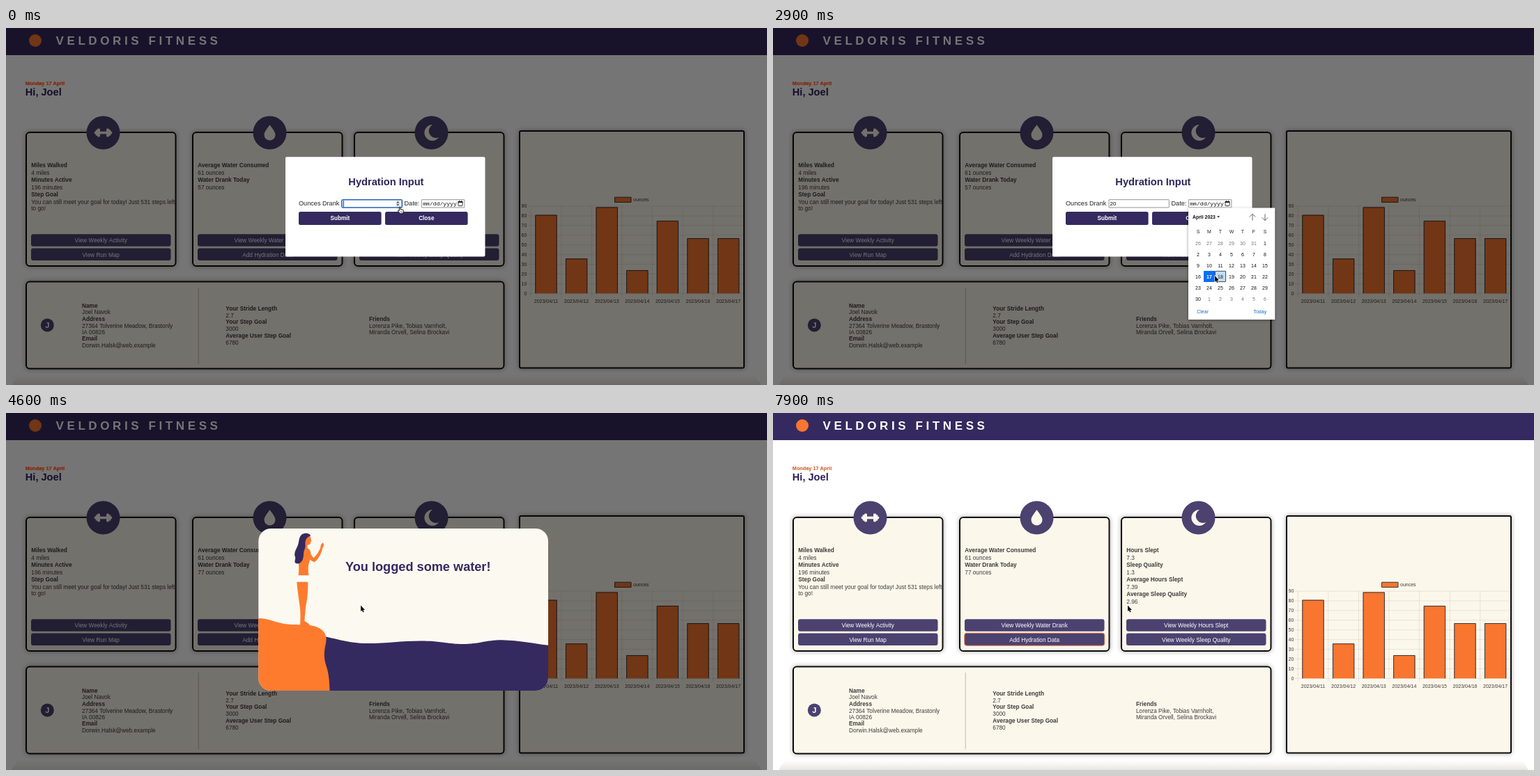
Animation, 1092 px wide and 513 px high, one loop 8000 ms. Source, as an HTML page with a canvas:

```html
<!DOCTYPE html>
<html lang="en">
<head>
<meta charset="utf-8">
<title>Fitness dashboard</title>
<style>
html, body { margin: 0; width: 100%; height: 100%; overflow: hidden; background: #fff; }
canvas { display: block; width: 1092px; height: 513px; }
</style>
</head>
<body>
<canvas id="stage"></canvas>
<script>
const W = 1092, H = 513, LOOP = 8000, STEP = 100;
const SANS = '"Liberation Sans", Arial, sans-serif';
const MONO = '"Liberation Mono", monospace';
const NAVY = '#352a5f', PURPLE = '#4b4270', ORANGE = '#f8762f', CREAM = '#fcf7eb', INK = '#3f3b3c';
const BODY = 8.25;

const canvas = document.getElementById('stage');
const c = canvas.getContext('2d');
const ratio = window.devicePixelRatio || 1;
canvas.width = W * ratio;
canvas.height = H * ratio;

// Event times in ms
const AT = { two: 1000, zero: 1200, open: 1900, picked: 3400, logged: 4600, closed: 7600 };

// Pointer stops: time, x, y
const STOPS = [
  [0, 565, 257], [200, 612, 259], [900, 612, 259], [1500, 642, 240.5], [1800, 651, 251],
  [2100, 651, 251], [2700, 634, 356], [2900, 634, 356], [3200, 630, 357],
  [3600, 630, 357], [4200, 509, 276.5], [8000, 509, 276.5]
];

function pointer(t) {
  const i = Math.max(1, STOPS.findIndex(s => s[0] > t));
  const [t0, x0, y0] = STOPS[i - 1], [t1, x1, y1] = STOPS[i];
  const k = (t - t0) / (t1 - t0), e = k * k * (3 - 2 * k);
  return { x: x0 + (x1 - x0) * e, y: y0 + (y1 - y0) * e };
}

function text(str, x, y, { size = BODY, color = INK, bold = false, align = 'left', font = SANS, gap = 0 } = {}) {
  c.font = `${bold ? 'bold ' : ''}${size}px ${font}`;
  c.letterSpacing = gap + 'px';
  c.textAlign = align;
  c.textBaseline = 'alphabetic';
  c.fillStyle = color;
  c.fillText(str, x, y);
}

function rect(x, y, w, h, color) {
  c.fillStyle = color;
  c.fillRect(x, y, w, h);
}

function box(x, y, w, h, r, fill, stroke, line = 1) {
  c.beginPath();
  c.roundRect(x, y, w, h, r);
  if (fill) { c.fillStyle = fill; c.fill(); }
  if (stroke) { c.strokeStyle = stroke; c.lineWidth = line; c.stroke(); }
}

function disc(x, y, r, color) {
  c.beginPath();
  c.arc(x, y, r, 0, Math.PI * 2);
  c.fillStyle = color;
  c.fill();
}

function shape(path, fill, stroke, line = 1) {
  const p = new Path2D(path);
  if (fill) { c.fillStyle = fill; c.fill(p); }
  if (stroke) { c.strokeStyle = stroke; c.lineWidth = line; c.stroke(p); }
}

function at(x, y, draw) {
  c.save();
  c.translate(x, y);
  draw();
  c.restore();
}

function shadow(color, blur, draw, dy = 0) {
  c.save();
  c.shadowColor = color;
  c.shadowBlur = blur * ratio;
  c.shadowOffsetY = dy * ratio;
  draw();
  c.restore();
}

function panel(x, y, w, h, r = 5) {
  shadow('rgba(70,60,50,.45)', 6, () => box(x, y, w, h, r, CREAM));
  box(x + 1, y + 1, w - 2, h - 2, r, CREAM, '#0b0a0c', 2);
}

// Rows of [baseline, text, bold]
function rows(x, list) {
  for (const [y, str, bold] of list) text(str, x, y, { bold: !!bold });
}

function pageButton(x, y, label) {
  box(x, y, 200.5, 17.5, 3, PURPLE);
  text(label, x + 100.2, y + 12, { color: '#fff', align: 'center' });
}

function card(x, icon, list, labels) {
  panel(x, 149, 216.5, 194);
  disc(x + 111.5, 150.5, 24, PURPLE);
  at(x + 111.5, 150.5, icon);
  rows(x + 8.3, list);
  labels.forEach((label, i) => pageButton(x + 8, 296.3 + i * 20.2, label));
}

function dumbbell() {
  box(-6, -1.8, 12, 3.6, 0, CREAM);
  for (const s of [-1, 1]) {
    box(s * 6.5 - 2, -6, 4, 12, 1.4, CREAM);
    box(s * 9.2 - 1.6, -4.3, 3.2, 8.6, 1.2, CREAM);
    box(s * 11.2 - 1.5, -1.7, 3, 3.4, 0.9, CREAM);
  }
}

function drop() {
  shape('M0 -11.5C2 -8 8 -2 8 3A8 8 0 0 1 -8 3C-8 -2 -2 -8 0 -11.5Z', CREAM);
}

function moon() {
  shape('M1.5 -11.4A11.4 11.4 0 1 0 10.8 6.2A9.2 9.2 0 0 1 1.5 -11.4Z', CREAM);
}

function chart() {
  panel(736, 147, 324, 342.5, 2);
  const left = 753.2, base = 381.4, col = 43.6, unit = 1.393;
  c.save();
  c.beginPath();
  c.rect(738, 149, 320, 338);
  c.clip();
  const grid = 'rgba(0,0,0,.1)';
  for (let v = 0; v <= 90; v += 10) {
    const y = base - v * unit;
    rect(749, y - 0.4, 310, 0.8, grid);
    text(String(v), 747.3, y + 2.4, { size: 7, align: 'right' });
  }
  for (let i = 0; i <= 7; i++) rect(left + i * col - 0.4, base - 90 * unit, 0.8, 90 * unit + 4.5, grid);
  [81, 36, 89, 24, 75, 57, 57].forEach((v, i) => {
    const x = left + (i + 0.5) * col, y = base - v * unit;
    rect(x - 15.6, y, 31.2, v * unit, ORANGE);
    shape(`M${x - 15.2} ${base}V${y + 0.5}H${x + 15.2}V${base}`, null, '#35343f', 1);
    text('2023/04/' + (11 + i), x, 394.6, { size: 7, align: 'center' });
  });
  c.restore();
  box(873.5, 243.2, 23.5, 7.2, 0, ORANGE, '#35343f', 1);
  text('ounces', 900, 249.2, { size: 7 });
}

function profile() {
  panel(28, 363.5, 687.5, 127);
  rect(275.7, 373, 0.9, 110, '#b9b5ae');
  disc(59.3, 427, 9.5, PURPLE);
  text('J', 59.3, 431, { size: 11, bold: true, color: '#fff', align: 'center' });
  rows(109, [
    [401.5, 'Name', 1], [411.3, 'Joel Navok'], [420.5, 'Address', 1],
    [430.6, '27364 Tolverine Meadow, Brastonly'], [440, 'IA 00826'],
    [449.2, 'Email', 1], [459.2, 'Dorwin.Halsk@web.example']
  ]);
  rows(315.3, [
    [406.2, 'Your Stride Length', 1], [415.8, '2.7'], [425.3, 'Your Step Goal', 1],
    [435.4, '3000'], [444.5, 'Average User Step Goal', 1], [454.7, '6780']
  ]);
  rows(521, [
    [420.6, 'Friends', 1], [430.6, 'Lorenza Pike, Tobias Varnholt,'], [440, 'Miranda Orvell, Selina Brockavi']
  ]);
}

function dateLine(color) {
  text('Monday 17 April', 27.8, 81.8, { size: 7.3, bold: true, color });
}

function page(t) {
  rect(0, 0, W, H, '#fff');
  rect(0, 0, W, 39, NAVY);
  disc(42, 18, 9, ORANGE);
  text('VELDORIS FITNESS', 71.5, 23.8, { size: 17, bold: true, color: '#fff', gap: 4.6 });
  dateLine('#c9531f');
  text('Hi, Joel', 27.8, 97.4, { size: 14.6, bold: true, color: '#2b2058' });

  const glow = c.createLinearGradient(0, 498, 0, H);
  glow.addColorStop(0, 'rgba(235,233,224,0)');
  glow.addColorStop(1, 'rgba(225,223,216,.8)');
  box(8, 498, 1076, 40, 20, glow);

  card(28, dumbbell, [
    [200, 'Miles Walked', 1], [210.8, '4 miles'], [221, 'Minutes Active', 1], [231.7, '196 minutes'],
    [242, 'Step Goal', 1], [252.6, 'You can still meet your goal for today! Just 531 steps left'], [262, 'to go!']
  ], ['View Weekly Activity', 'View Run Map']);
  card(267, drop, [
    [200, 'Average Water Consumed', 1], [210.8, '61 ounces'],
    [221, 'Water Drank Today', 1], [231.7, (t < AT.logged ? 57 : 77) + ' ounces']
  ], ['View Weekly Water Drank', 'Add Hydration Data']);
  card(499, moon, [
    [200, 'Hours Slept', 1], [210.8, '7.3'], [221, 'Sleep Quality', 1], [231.7, '1.3'],
    [242, 'Average Hours Slept', 1], [252.6, '7.39'], [263, 'Average Sleep Quality', 1], [273.6, '2.96']
  ], ['View Weekly Hours Slept', 'View Weekly Sleep Quality']);
  chart();
  profile();

  const focus = Math.min(1, (t - AT.closed) / 300);
  if (focus > 0) {
    c.globalAlpha = focus;
    box(274.8, 316.3, 200.9, 17.9, 3, null, '#d9663a', 1);
    c.globalAlpha = 1;
  }
}

function modalButton(x, label, hover) {
  at(x + 59.3, 273.4, () => {
    if (hover) c.scale(1.05, 1.05);
    box(-59.3, -9.5, 118.6, 19, 2.5, NAVY);
    text(label, 0, 2.9, { size: 8.2, bold: true, color: '#fff', align: 'center' });
  });
}

function modal(t, p) {
  const over = x => p.x > x && p.x < x + 119 && p.y > 264 && p.y < 283;
  const dark = { size: 9.15, color: '#222' };
  box(401, 185.3, 286.5, 143.2, 2, '#fff');
  text('Hydration Input', 545.4, 226.2, { size: 14.65, bold: true, color: '#2f2459', align: 'center' });
  text('Ounces Drank', 420, 255, dark);
  text('Date:', 571.5, 255, dark);

  const focused = t < AT.open;
  const value = t < AT.two ? '' : t < AT.zero ? '2' : '20';
  box(482, 246.7, 86.3, 11.3, focused ? 1.5 : 0.5, '#fff', focused ? '#2563b8' : '#777', focused ? 1.6 : 0.8);
  text(value, 483.6, 255.2, { size: 8, color: '#111' });
  if (focused) {
    box(558.8, 248, 7, 8.8, 1.5, '#e8e8e8');
    shape('M560.4 251.6L562.3 249L564.2 251.6ZM560.4 253.2L562.3 255.8L564.2 253.2Z', '#444');
    const caret = t < 200 || (t >= 800 && t < 1700);
    if (caret) rect(484 + value.length * 4.4, 248, 0.8, 9, '#111');
  }

  box(596.3, 246.7, 61.6, 11.3, 0.5, '#fff', '#777', 0.8);
  text(t < AT.picked ? 'mm/dd/yyyy' : '04/17/2023', 598.2, 255.2, { size: 8.1, font: MONO, color: '#111' });
  box(649, 249.4, 6, 6.2, 0.6, null, '#222', 0.9);
  rect(648.6, 249, 6.8, 2, '#222');
  rect(650, 248, 0.9, 1.2, '#222');
  rect(653.2, 248, 0.9, 1.2, '#222');

  const calendarOpen = t >= AT.open && t < AT.picked;
  modalButton(420, 'Submit', over(420) && !calendarOpen);
  modalButton(544, 'Close', over(544) && !calendarOpen);
  if (calendarOpen) calendar(p);
  return !calendarOpen && (t < 100 || over(420) || over(544));
}

function calendar(p) {
  shadow('rgba(0,0,0,.4)', 4, () => rect(596, 258.5, 124.3, 160.5, '#fff'), 1);
  text('April 2023', 602, 273.8, { size: 6.9, bold: true, color: '#111' });
  shape('M637 270.2H641.2L639.1 272.6Z', '#222');
  shape('M688 276.5V267.3M683.8 271.5L688 267.3L692.2 271.5M706 267.3V276.5M701.8 272.3L706 276.5L710.2 272.3', null, '#666', 1);
  const hoverCol = Math.floor((p.x - 602) / 16), hoverRow = Math.floor((p.y - 301) / 16);
  for (let col = 0; col < 7; col++) {
    const x = 610 + col * 16;
    text('SMTWTFS'[col], x, 295, { size: 7, color: '#222', align: 'center' });
    for (let row = 0; row < 6; row++) {
      const n = row * 7 + col - 5, y = 309 + row * 16;
      const inMonth = n > 0 && n <= 30, today = n === 17;
      const hover = col === hoverCol && row === hoverRow;
      if (today) rect(x - 8, y - 8, 16, 16, '#0c6ff0');
      else if (hover) box(x - 7.6, y - 7.6, 15.2, 15.2, 0.5, '#c3dcf0', '#2b3a48', 0.9);
      const label = n <= 0 ? n + 31 : n > 30 ? n - 30 : n;
      text(String(label), x, y + 2.5, {
        size: 7, align: 'center', bold: today,
        color: today ? '#fff' : inMonth ? '#111' : '#777'
      });
    }
  }
  const link = { size: 7, color: '#1a6bbd', align: 'center' };
  text('Clear', 616.6, 409.5, link);
  text('Today', 698.8, 409.5, link);
}

function popup() {
  const skin = '#fe7b2e', paper = '#fcf9f1';
  c.save();
  c.beginPath();
  c.roundRect(362.3, 166, 415.7, 233, 18);
  c.clip();
  rect(362, 166, 417, 234, paper);
  shape('M450 320C476 324 490 331 518 331C550 331 570 327 600 327.5C625 328 635 332 655 332C680 332 690 326 712 326.3C738 327 755 331 779 334V400H450Z', NAVY);
  shape('M362 295C378 295 388 302 404 303.5C420 305 428 303 441 306C454 309 460 317 459.5 326C459 334 456 340 457 352C458 364 464 366 464.5 400H362Z', skin);
  // Legs and foot
  shape('M417.3 242.5H433.2C433.5 258 432.5 266 430.5 276C429.5 284 428.8 291 428.4 299C431 300.5 434.5 302 436 305H422C422.5 296 423 287 421.5 277C420 265 418 254 417.3 242.5Z', skin);
  // Torso, shorts, face
  shape('M421 196C426 191 432 192 436 197C439 203 437 210 434.5 216C433 222 433.5 228 434.5 233.5H419.5C421 225 420 218 419.5 210Z', skin);
  shape('M419.5 233.5H434.5L433.6 242.5H417.5Z', '#fff');
  shape('M427 175C433 172.5 438 176 437.5 181C438.6 183.5 438 184 437.3 185C437.3 189 435 190 432.5 189.5V197H425Z', skin);
  // Raised arm
  shape('M433 197C437 201 439 206 441.5 208.3C446 204 449.5 198 451.5 193C451 190 453 187 455 186.6C456.4 188 456.3 191 454.3 194C452.5 202 448.5 210 442.8 214.2C437 213 434 208 431 203Z', skin);
  // Hair
  shape('M437.2 176C434 171.5 427 171.8 423.5 175.5C419.5 180 421 186 418 192C415 198 413 202 415 207C416 210 413 213 415.5 215.8C419 218 423.5 215.5 425.5 211C428 205 426 201 428.5 196C431 191 428 186 430.5 182C432 178.5 434.5 178 437.2 176Z', NAVY);
  c.restore();
  text('You logged some water!', 487, 227.4, { size: 18.17, bold: true, color: NAVY });
}

function arrow(p) {
  at(p.x, p.y, () => {
    c.lineJoin = 'round';
    shape('M0 0V8.6L1.9 6.9L3.2 9.9L4.6 9.3L3.4 6.4H6Z', '#0a0a0a', '#fff', 1.2);
    shape('M0 0V8.6L1.9 6.9L3.2 9.9L4.6 9.3L3.4 6.4H6Z', '#0a0a0a');
  });
}

function hand(p) {
  at(p.x, p.y, () => {
    c.lineJoin = 'round';
    shape('M-.7 .8C-.7 -.3 1 -.3 1 .8V3.6L4.6 4.3C5.6 4.6 5.7 5.4 5.5 6.4L4.7 9.8H.5L-2.4 6.2C-2.9 5.2 -1.8 4.6 -.7 5.8Z', '#fff', '#111', 1);
    shape('M1.2 6.4V8.4M2.6 6.4V8.4M4 6.4V8.4', null, '#111', 0.5);
  });
}

function draw(now) {
  const t = Math.floor((now % LOOP) / STEP) * STEP;
  const p = pointer(t);
  let overButton = false;
  c.setTransform(ratio, 0, 0, ratio, 0, 0);
  page(t);
  if (t < AT.closed) {
    rect(0, 0, W, H, 'rgba(0,0,0,.54)');
    dateLine('#8f2f14');
    if (t < AT.logged) overButton = modal(t, p);
    else popup();
  }
  (overButton ? hand : arrow)(p);
}

const start = performance.now();
function tick() {
  draw(performance.now() - start);
  requestAnimationFrame(tick);
}
tick();
</script>
</body>
</html>
```
